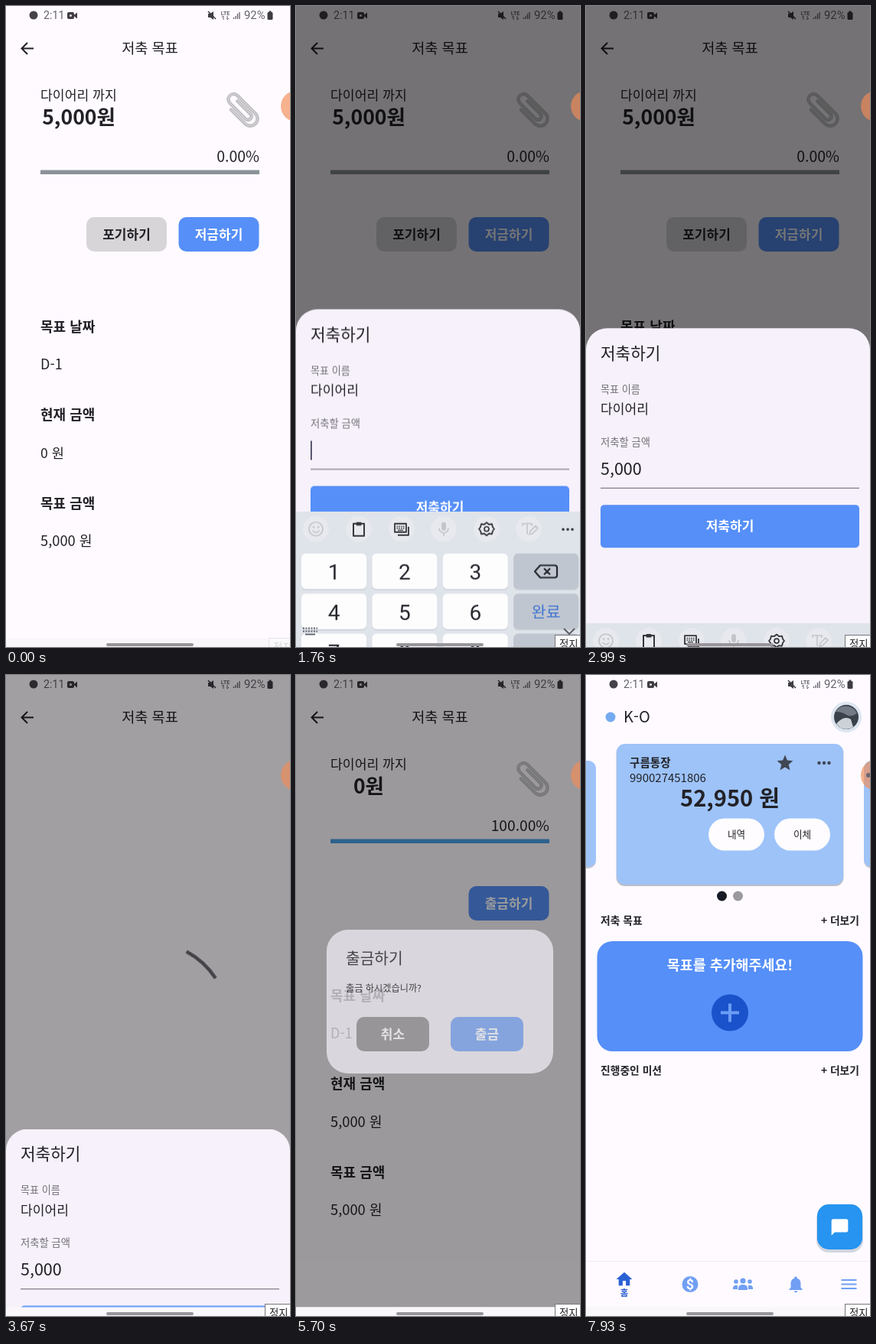
Recreate the animation shown at these times as an HTML page. Size 371 by 838 pixels, loop 8000 ms.

```html
<!DOCTYPE html>
<html lang="ko">
<head>
<meta charset="utf-8">
<title>저축 목표</title>
<style>
html, body { margin: 0; width: 100%; height: 100%; overflow: hidden; background: #fefaff; }
svg { display: block; width: 100vw; height: 100vh; }
text { font-family: "Noto Sans CJK KR", "Noto Sans CJK", "Noto Sans", sans-serif; white-space: pre; }
.num { font-family: Roboto, "Noto Sans", sans-serif; }
</style>
</head>
<body>
<svg id="stage" viewBox="0 0 371 838" preserveAspectRatio="none"></svg>
<script>
const LOOP = 8000;
const INK = '#222126', BLUE = '#568ff8', PAPER = '#fefaff';

// ---- markup helpers ----
const text = (x, cy, size, str, { fill = INK, w = 500, a = 'start', c = '', id = '' } = {}) =>
  `<text id="${id}" class="${c}" x="${x}" y="${cy + size * 0.37}" font-size="${size}" font-weight="${w}" fill="${fill}" text-anchor="${a}">${str}</text>`;
const rect = (x, y, w, h, r, fill, extra = '') =>
  `<rect x="${x}" y="${y}" width="${w}" height="${h}" rx="${r}" fill="${fill}" ${extra}/>`;
const disc = (x, y, r, fill, extra = '') => `<circle cx="${x}" cy="${y}" r="${r}" fill="${fill}" ${extra}/>`;
const line = (d, stroke = INK, w = 2, extra = '') =>
  `<path d="${d}" fill="none" stroke="${stroke}" stroke-width="${w}" ${extra}/>`;
const group = (id, inner, extra = '') => `<g id="${id}" ${extra}>${inner}</g>`;
// 24-unit icon centred on a point
const icon = (cx, cy, size, fill, d) =>
  `<path transform="translate(${cx - size / 2} ${cy - size / 2}) scale(${size / 24})" fill="${fill}" d="${d}"/>`;
const button = (id, x, y, w, h, r, fill, label, color = '#fff', size = 17) =>
  rect(x, y, w, h, r, fill) + text(x + w / 2, y + h / 2, size, label, { fill: color, w: 700, a: 'middle' }) +
  rect(x, y, w, h, r, '#fff', `id="${id}" opacity="0"`);

// ---- status bar ----
const grey = '#65626a';
const status = disc(36, 12, 5.5, '#45424a') +
  text(49, 12, 14.2, '2:11', { fill: grey, w: 400, c: 'num' }) +
  rect(80, 8, 9, 9, 2, '#3f3c43') + `<path d="M88 12.5l5-4v8z" fill="#3f3c43"/>` +
  disc(84.5, 12.5, 1.5, '#eee') +
  `<path d="M264 10h3l4-3v11l-4-3h-3z" fill="#3f3c43"/>` + line('M264 7l10 10', '#3f3c43', 1.6) +
  text(286.5, 9, 7, 'LTE', { fill: grey, w: 700, a: 'middle', c: 'num' }) +
  line('M284 18v-5l-2 2M289 13v5l2-2', grey, 1) +
  line('M297.5 17v-2M300 17v-4M302.500 17v-7M305 17v-9', grey, 1.3) +
  text(311, 12, 14.8, '92%', { fill: grey, w: 400, c: 'num' }) +
  rect(341.500, 8, 7, 10, 1.5, '#3f3c43') + rect(343.500, 6.500, 3, 2, 0, '#3f3c43');

// ---- goal page ----
const clip = group('', ['#b4b2b6 4.2', '#d8d7da 1.5'].map(s => {
  const [c, w] = s.split(' ');
  return line('M4-12V12a4.5 4.5 0 0 1-9 0V-17a7 7 0 0 1 14 0V16a9.5 9.500 0 0 1-19 0V-10', c, w, 'stroke-linecap="round"');
}).join(''), 'transform="translate(308 135.500) rotate(-45)"');

const before = text(95, 145, 26.5, '5,000원', { w: 700, a: 'middle' }) +
  text(331, 197, 19.5, '0.00%', { a: 'end' }) + rect(45, 214.500, 286, 5.5, 0, '#8b9298') +
  button('', 105, 276, 105, 45, 10, '#d7d5d8', '포기하기', INK) +
  button('save', 225.500, 276, 105, 45, 10, BLUE, '저금하기') +
  text(45, 584, 17.6, '0 원');
const after = text(95, 145, 26.5, '0원', { w: 700, a: 'middle' }) +
  text(331, 197, 19.2, '100.00%', { a: 'end' }) + rect(45, 214.500, 286, 5.5, 0, '#4aa0e6') +
  button('draw', 225.500, 276, 105, 45, 10, BLUE, '출금하기') +
  text(45, 584, 18.3, '5,000 원');
const body = text(45, 117, 17.2, '다이어리 까지') + clip +
  ['목표 날짜', '현재 금액', '목표 금액'].map((s, i) => text(45, 419 + i * 115.5, 18, s, { w: 700 })).join('') +
  text(45, 468, 18, 'D-1') + text(45, 699, 18.3, '5,000 원') +
  group('before', before) + group('after', after);
const header = line('M36 55.5H21M28 48l-7.5 7.5L28 63', INK, 2) +
  text(188, 55, 18.6, '저축 목표', { a: 'middle' });
const spinner = `<circle id="spin" cx="186" cy="454" r="105" fill="none" stroke="#69676f" stroke-width="4.5" pathLength="360"/>`;

// ---- home page ----
const pale = '#9dc3f9', navBlue = '#709ff3';
const avatar = disc(340, 55, 20, '#dde5f0') + disc(340, 55, 16, '#3b414b') +
  `<path d="M326 48a16 16 0 0 1 28 2q-8 6-14 2t-14-4z" fill="#737b86"/>` +
  `<path d="M327 64q10-12 19-6l3 10a16 16 0 0 1-22-4z" fill="#ccd2d8"/>`;
const home = rect(0, 22, 371, 804, 0, PAPER) +
  disc(32, 55, 6.5, '#74aaf0') + text(49, 55, 20, 'K-O', { w: 400 }) + avatar +
  rect(-20, 113, 33, 140, 10, '#c9c8cf') + rect(-20, 112, 33, 139, 10, pale) +
  rect(363, 113, 33, 140, 10, '#c9c8cf') + rect(363, 112, 33, 139, 10, pale) +
  rect(39.500, 91, 297, 185, 11, '#bdbec7') + rect(40, 90, 296, 184, 11, pale) +
  text(57, 115, 14.6, '구름통장', { w: 700 }) + text(57, 134, 15, '990027451806', { w: 400 }) +
  icon(260, 115, 25, '#404654', 'M12 17.27L18.18 21l-1.64-7.03L22 9.24l-7.19-.61L12 2 9.19 8.63 2 9.24l5.46 4.73L5.82 21z') +
  [304.5, 311, 317.5].map(x => disc(x, 115, 2.2, '#404654')).join('') +
  text(188, 161, 29, '52,950 원', { w: 700, a: 'middle' }) +
  [[160, '내역'], [246, '이체']].map(([x, s]) =>
    rect(x, 187.500, 73, 42, 21, '#fefcff') + text(x + 36.5, 208, 12.6, s, { a: 'middle' })).join('') +
  disc(177.5, 289, 6.5, '#181a26') + disc(198.5, 289, 6.5, '#9b989f') +
  [[321, '저축 목표'], [517, '진행중인 미션']].map(([y, s]) =>
    text(19, y, 13.8, s, { w: 700 }) + text(357, y, 13.8, '+ 더보기', { w: 700, a: 'end' })).join('') +
  rect(14.500, 348, 347, 144, 20, BLUE) +
  text(188, 379, 18.4, '목표를 추가해주세요!', { fill: '#fff', w: 700, a: 'middle' }) +
  disc(188, 441.5, 24, '#1a52cb') + line('M176 441.500h24M188 429.500v24', '#6b9df7', 4) +
  rect(301, 695, 61, 60, 16, '#d2d5df') + rect(302, 692, 59, 59, 15, '#2694f0') +
  icon(331.5, 722, 26, '#fff', 'M20 2H4c-1.100 0-2 .9-2 2v18l4-4h14c1.100 0 2-.9 2-2V4c0-1.100-.9-2-2-2z') +
  rect(0, 766, 371, 1, 0, '#f0ecf2') +
  icon(50, 790, 25, '#2a61d4', 'M10 20v-6h4v6h5v-8h3L12 3 2 12h3v8z') +
  text(50, 808, 11.5, '홈', { fill: '#2a61d4', w: 700, a: 'middle' }) +
  disc(136, 796.5, 10.5, navBlue) + text(136, 796.5, 18, '$', { fill: PAPER, w: 700, a: 'middle', c: 'num' }) +
  [[196, 793, 2.8], [214, 793, 2.8], [205, 792, 3.6]].map(([x, y, r]) => disc(x, y, r, navBlue)).join('') +
  `<path d="M192 803v-2q1-4 6-3v5zM199 804v-2q0-5 6-5t6 5v2zM212 803v-5q5-1 6 3v2z" fill="${navBlue}"/>` +
  icon(274, 796.5, 26, navBlue, 'M12 22c1.100 0 2-.9 2-2h-4c0 1.100.9 2 2 2zm6-6v-5c0-3.070-1.640-5.640-4.500-6.320V4a1.500 1.500 0 0 0-3 0v.68C7.630 5.360 6 7.920 6 11v5l-2 2v1h16v-1z') +
  line('M333.500 791h20M333.500 796.500h20M333.500 802h20', navBlue, 2.2);

// ---- bottom sheet, drawn from its own top ----
const hint = { fill: '#737077' };
const sheet = `<path d="M0 420V28A28 28 0 0 1 28 0H343A28 28 0 0 1 371 28V420z" fill="#f6f1fa"/>` +
  text(19, 33, 21.3, '저축하기') + text(19, 80, 13.1, '목표 이름', hint) +
  text(19, 106, 17.1, '다이어리') + text(19, 149, 13.3, '저축할 금액', hint) +
  ['5', '50', '500', '5,000'].map((s, i) => text(19, 184, 21.5, s, { id: 'v' + i })).join('') +
  rect(0, 172, 1.8, 25, 0, '#48445f', 'id="caret"') +
  rect(19, 208.500, 338, 1.3, 0, '#858189') + rect(19, 208.500, 338, 2, 0, '#625d88', 'id="focus"') +
  button('submit', 19, 231, 338, 56, 5, BLUE, '저축하기');

// ---- keypad ----
const KEY = '#fdfdfe', SIDE = '#c0c6d0';
const keyRows = ['123<', '456D', '789.', ' 0 ,'];
const labels = { D: '완료', '.': '.-', '<': '', ' ': '' };
const keys = keyRows.map((row, r) => [...row].map((k, c) => {
  const x = 7 + c * 92.4, y = 579 + r * 52.4, label = labels[k] ?? k, num = /\d/.test(k);
  const ink = k === 'D' ? '#3f73cf' : k === ',' ? '#8a909c' : '#25272d';
  return rect(x, y + 1, 85, 47, 6, '#cbd0d8') + rect(x, y, 85, 46.5, 6, num ? KEY : SIDE, num || k === 'D' ? `id="k${k}"` : '') +
    text(x + 42.5, y + 24, k === 'D' ? 20.5 : 28, label, { fill: ink, w: k === 'D' ? 500 : 400, a: 'middle', c: k === 'D' ? '' : 'num' });
}).join('')).join('');
const dim = '#c3c5cb', dark = '#34363c';
const tools = [26, 82, 138, 193, 249, 304].map(x => disc(x, 547, 17, '#e7e9ee')).join('') +
  disc(26, 547, 9, 'none', `stroke="${dim}" stroke-width="1.7"`) + disc(23, 544.5, 1.3, dim) + disc(29, 544.5, 1.3, dim) +
  line('M21.500 549q4.500 5 9 0', dim, 1.5) +
  line('M75 540h14v16h-14zM79 541h6', dark, 2, 'stroke-linejoin="round"') + rect(78.500, 538, 7, 4.5, 1, dark) +
  line('M129 540h15v11h-15zM133 555h14v-11', dark, 1.8, 'stroke-linejoin="round"') +
  line('M131.500 543.500h10M131.500 546h10', dark, 1.4, 'stroke-dasharray="1.6 1.2"') + line('M133 548.500h7', dark, 1.3) +
  rect(190, 538, 6, 11, 3, dim) + line('M187 546a6 6 0 0 0 12 0M193 552v4', dim, 1.7) +
  line('M249 538.500l3 2.500 4-.5 1 4 2 2.500-2 2.500-1 4-4-.5-3 2.500-3-2.500-4 .5-1-4-2-2.500 2-2.500 1-4 4 .5z', dark, 1.8, 'stroke-linejoin="round"') +
  disc(249, 547, 3, 'none', `stroke="${dark}" stroke-width="1.7"`) +
  line('M296 543v-3h12v3M302 540v14M305 554l1-4 7-7 3 3-7 7z', dim, 1.6) +
  [349, 355, 361].map(x => disc(x, 547.5, 1.8, dark)).join('');
const backspace = line('M312 602.500l7-8h19q3 0 3 3v10q0 3-3 3h-19zM324 598.500l8 8M332 598.500l-8 8', '#25272d', 2.2, 'stroke-linejoin="round"');
const keypad = rect(0, 524, 371, 330, 0, '#dfe3ea') + tools + keys + backspace;
const padFoot = line('M9 813.500h19M9 817.500h19', '#5d6068', 1.8, 'stroke-dasharray="2 1.5"') +
  line('M12 821.500h13', '#5d6068', 1.8) + line('M350 814l7 7 7-7', '#55585f', 1.8);

// ---- dialog ----
const dialog = rect(40, 333, 296, 188, 28, '#f3eef7') +
  text(65, 370, 20.3, '출금하기') + text(65, 409, 12.2, '출금 하시겠습니까?', { w: 400 }) +
  button('', 79, 447, 95, 45, 10, '#969498', '취소') + button('ok', 202, 447, 95, 45, 10, BLUE, '출금');

const tip = rect(338.500, 822.500, 40, 24, 0, '#fff', 'stroke="#77757a"') + text(344, 834.5, 13.4, '정지', { w: 400 });

stage.innerHTML = rect(0, 0, 371, 838, 0, PAPER) + header + group('body', body) + spinner +
  group('home', home) + status +
  rect(0, 0, 371, 826.5, 0, '#000', 'id="scrim"') +
  group('dialog', dialog) + group('sheet', sheet) +
  rect(0, 826.500, 371, 12, 0, '#f9f7fa') +
  group('pad', keypad) + group('foot', padFoot) +
  disc(379, 131, 20, 'rgb(242,140,87)', 'opacity=".67"') + disc(369, 131, 3, '#6d6670', 'id="dot"') +
  rect(131, 833, 114, 4, 2, '#98959a') + group('tip', tip);

// ---- motion: tables of [ms, value] ----
function move(id, prop, table, make = v => v, easing = 'linear') {
  const all = [[0, table[0][1]], ...table, [LOOP, table.at(-1)[1]]];
  document.getElementById(id).animate(
    all.map(([t, v]) => ({ offset: t / LOOP, [prop]: make(v), easing })),
    { duration: LOOP, iterations: Infinity });
}
const fade = (id, table) => move(id, 'opacity', table);
const step = (id, prop, table) => move(id, prop, [[0, table[0][1]], ...table], v => v, 'steps(1, end)');
const show = (id, from, to = LOOP) => step(id, 'opacity', [[0, from ? 0 : 1], [from, 1], [to, to < LOOP ? 0 : 1]]);
const slideY = (id, table) => move(id, 'transform', table, v => `translate(0px, ${v}px)`);
const tap = (id, t) => fade(id, [[t, 0], [t + 90, .25], [t + 220, .2], [t + 380, 0]]);
const press = (id, base, down, ...times) =>
  step(id, 'fill', [[0, base], ...times.map((t, i) => [t, i % 2 ? base : down])]);

fade('body', [[3555, 1], [3560, 0], [3735, 0], [3740, 1], [6530, 1], [6860, 0]]);
show('before', 0, 3600);
show('after', 3600);
show('spin', 3560, 3740);
move('spin', 'strokeDasharray', [[3560, 2], [3670, 28], [3740, 60]], v => `${v} ${360 - v}`);
stage.querySelector('#spin').style.transformOrigin = '186px 454px';
move('spin', 'transform', [[3560, -86], [3670, -62], [3740, -42]], v => `rotate(${v}deg)`);
fade('home', [[7180, 0], [7250, .2], [7390, .9], [7450, 1]]);
show('dot', 7400);

fade('scrim', [[690, 0], [760, .12], [970, .5], [1080, .54], [3560, .54], [3670, .37], [3740, 0],
  [4770, 0], [4870, .46], [4960, .54], [5650, .54], [5830, 0]]);
slideY('sheet', [[700, 838], [820, 690], [890, 610], [960, 563], [1050, 532], [1200, 520],
  [1600, 520], [1690, 480], [1760, 398], [1830, 290], [1900, 232], [1980, 216],
  [2850, 216], [2920, 290], [2990, 420], [3060, 500], [3130, 520], [3580, 520], [3670, 590], [3740, 838]]);
slideY('pad', [[1590, 314], [1690, 240], [1760, 138], [1830, 50], [1900, 12], [1980, 0],
  [2800, 0], [2870, 70], [2940, 200], [3010, 314]]);
show('foot', 1650, 2960);
show('focus', 1800, 2900);
show('caret', 1620, 2900);
step('caret', 'x', [[0, '19px'], [2040, '32px'], [2140, '44px'], [2240, '56px'], [2380, '75px']]);
[2040, 2140, 2240, 2380, 3760].forEach((t, i, at) => i < 4 && show('v' + i, t, at[i + 1]));

press('k5', KEY, '#a0aab6', 2000, 2100);
press('k0', KEY, '#a0aab6', 2120, 2190, 2220, 2280, 2310, 2640);
press('kD', SIDE, '#9fa8b5', 2700, 2830);
tap('save', 540);
tap('submit', 3400);
tap('draw', 4730);
tap('ok', 5560);

fade('dialog', [[4770, 0], [4870, .8], [4960, 1], [5650, 1], [5830, 0]]);
step('tip', 'opacity', [[0, .15], [540, 1]]);
step('tip', 'transform', [[0, 'translate(5px, 4px)'], [540, 'translate(0px, 0px)']]);
</script>
</body>
</html>
```
